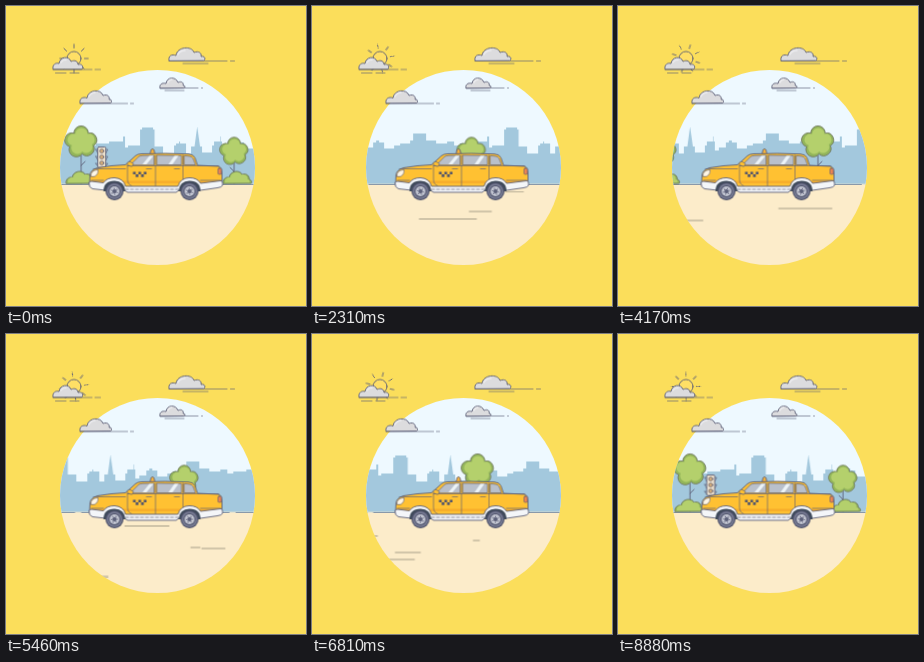
An HTML page that plays this animation: 300x300 px, repeating every 8910 ms.

```html
<!DOCTYPE html>
<html lang="en">
<head>
<meta charset="utf-8">
<title>Taxi ride</title>
<style>
  html, body { margin: 0; width: 100%; height: 100%; overflow: hidden; background: #fbde5b; }
  svg { display: block; width: 100vw; height: 100vh; }
  .ink { fill: none; stroke: #5c5e76; stroke-width: .9; stroke-linecap: round; stroke-linejoin: round; }
  .thin { stroke-width: .65; }
  .cloud { fill: #dcdcde; }
  .leaf { fill: #93b65a; stroke: #71795f; }
  .light { fill: #b4d06c; }
  .loop { animation: slide 8910ms linear infinite; }
  .city { --run: 224px; }
  .road { --run: 926.6px; }
  .trees { --run: 308.87px; animation-duration: 2970ms; }
  .kerb { --run: 154.43px; animation-duration: 1485ms; }
  .sun, .wheel { transform-box: view-box; animation: spin 2970ms linear infinite; }
  .sun { --turn: 45deg; transform-origin: 68px 53px; }
  .wheel { --turn: -360deg; animation-duration: 495ms; transform-origin: 0 0; }
  @keyframes slide { to { transform: translateX(var(--run)); } }
  @keyframes spin { to { transform: rotate(var(--turn)); } }
</style>
</head>
<body>
<svg viewBox="0 0 300 300">
  <defs>
    <clipPath id="disc"><circle cx="151.5" cy="162" r="97.5"/></clipPath>

    <path id="skyline" d="M0 179V142H3V137H6V135H9V137H14V143H24V140H30V138H40V135H43V128H56V135H66V138H77V136H84
      V140H90V138H103V136H117V131H119V142H122V140H134V124H136V122H147V124H148.500V141H157V148H168V140H170V138H173V136H174V138H180
      V148H185V141H188.500L191.200 121L194 141H196V147H206V140H208V136H214V131H214.600V136H216V145H220V142H224V179Z"/>

    <path id="blob" d="M-7-8A7 7 0 0 1 7-8A6.600 6.600 0 0 1 12 4A7 7 0 0 1 1 12A7 7 0 0 1-11 5A6.800 6.800 0 0 1-7-8Z"/>
    <path id="mound" d="M-14 178C-15 174-11 171-8 172C-7 165 3 164 5 169C10 167 13 172 12 174C15 174 15 178 14 178Z"/>
    <g id="bush">
      <use href="#mound" class="ink leaf"/>
      <use href="#mound" class="light" transform="translate(0 24) scale(.86)"/>
    </g>
    <g id="canopy">
      <use href="#blob" class="ink leaf"/>
      <use href="#blob" class="light" transform="translate(.3 -.5) scale(.84)"/>
    </g>
    <g id="pair">
      <path class="ink" d="M75 178V150M75 160L79 156M228 178V157M228 166L224 162"/>
      <use href="#canopy" transform="translate(75 136) scale(1.04)"/>
      <use href="#canopy" transform="translate(228 145.500) scale(.92)"/>
      <use href="#bush" x="74"/>
      <use href="#bush" x="231"/>
    </g>

    <g id="signal">
      <path class="ink" d="M-1 178V162M1 178V162"/>
      <path class="ink thin" d="M-6 144H6L4 148M-6 144L-4 148M-6 151H6L4 155M-6 151L-4 155M-6 158H6L4 161M-6 158L-4 161"/>
      <rect class="ink" x="-4" y="141.500" width="8" height="20.500" rx="1" style="fill:#eee2cd"/>
      <g class="ink thin" style="fill:#d5ad79">
        <circle cy="145.500" r="2"/><circle cy="151.500" r="2"/><circle cy="157.500" r="2"/>
      </g>
    </g>

    <g id="tyre">
      <circle r="9" fill="#4c5069"/>
      <circle r="7.800" fill="#777b93"/>
      <circle r="5.900" fill="#4c5069"/>
      <circle r="5" fill="#c3c6d2"/>
      <path class="wheel ink thin" d="M-3.500 0H3.500M-1.750-3L1.750 3M1.750-3L-1.750 3"/>
      <circle r="2" fill="#5c6079"/>
    </g>
  </defs>

  <rect width="300" height="300" fill="#fbde5b"/>

  <g transform="translate(0 -.5)">
    <g clip-path="url(#disc)">
      <rect x="50" y="60" width="203" height="119" fill="#eef9ff"/>
      <g class="loop city" fill="#a3c8dd">
        <use href="#skyline"/><use href="#skyline" x="-224"/><use href="#skyline" x="224"/>
      </g>
      <rect x="50" y="178.500" width="203" height="84" fill="#fcecca"/>
      <path class="loop kerb ink" style="stroke:#7e91a6" stroke-dasharray="147.430 7" d="M-183.400 178.500H437"/>
      <g class="loop trees">
        <use href="#pair"/><use href="#pair" x="-308.87"/>
      </g>
      <g class="loop road">
        <use href="#signal" x="95.700"/><use href="#signal" x="-830.900"/>
        <path class="ink thin" style="stroke:#777365" d="M-47 186h18M11.500 218h20M-133 213.500h57M-83 206h22M-372 215h23M-273 203h53
          M-449 192.500h44M-383 214h9M-490 243h24M-665 202.500h22M-625 219h25M-631 226h25M-547 207h6"/>
      </g>
    </g>

    <!-- sun and clouds -->
    <g class="sun ink">
      <path id="rays" d="M68 42.500V38.800M68 63.500V67.200M57.500 53H53.800M78.500 53H82.200"/>
      <use href="#rays" transform="rotate(45 68 53)"/>
    </g>
    <circle class="ink" cx="68" cy="53" r="7" style="fill:#ffdf66"/>
    <g class="ink">
      <path class="cloud" d="M47 63.500C46 59 50 57 53 58C54 51 63 50 65 56C69 54 72 56 72 59C76 58 78 61 76 63.500Z"/>
      <path class="cloud" d="M163 55C162 50 166 48.500 170 50C171 41 186 40 188 47C193 45 196 48 195 51C199 50 200 54 198 55Z"/>
      <path class="cloud" d="M74 97.500C73 93 77 91 81 92.500C82 84 95 83 97 90C102 88 104 92 103 94C106 93 106 97.500 105 97.500Z"/>
      <path class="cloud" d="M154 82.500C153 79 156 77 160 78C161 71 170 71 172 77C176 75 178 78 177 80C180 80 179 82.500 178 82.500Z"/>
      <path class="thin" d="M47 64H86M89 64H94.500M49.500 67.500H60M64 67.500H73M163 55.500H221M224.500 55.500H228.500M177 58H202
        M74 98H121.500M124.500 98H127.500M154 82.500H192M195.500 82.500H196.500M159 85H178"/>
    </g>
    <g fill="none" stroke="#ececef" stroke-width="1.300" stroke-linecap="round">
      <path d="M55 57Q57 54 60 54.500M172 49Q174 45 179 45M83 91Q85 87 89 87M162 77Q163 74 166 74"/>
    </g>

    <!-- taxi -->
    <g transform="translate(-.5 -.2)">
      <path class="ink" d="M144.500 149L145.500 144.500Q147 142.500 148.500 144.500L149.500 149Z" style="fill:#f9b43a"/>
      <path class="ink" style="fill:#ffc132" d="M84 180L84.500 170Q85 164.500 92 162.500Q106 160 120 159.500L130 150.500Q132 148.700 136 148.500
        Q160 147.500 183 148.700Q188 149 189.500 152.500L192 160L213 161Q216.500 162 216.500 168V180L194 183H100Z"/>
      <path class="ink thin" style="fill:#b9c0cb" d="M125 159.500L133 151.500Q134 150.500 137 150.300L148.500 150V159.500ZM151.500 150L176 150.300V159.500H151.500ZM179 150.500Q186 150.500 187.500 153L190 159.500H179Z"/>
      <path fill="#edf4f8" d="M137 159L144 150.500H148L141 159ZM163 159L169 150.500H173L167 159Z"/>
      <path fill="#f7ae2b" d="M86 175.500H215V178H86Z"/>
      <path class="ink thin" d="M122 160.500V174Q122 179 126 180.500M150 150V180.500M177.500 150V174M88 163.500H120M122 160.500H213M86 175H98M195 175H215M141 163.500H146M169 163.500H174"/>
      <path class="ink thin" d="M122 159.500Q121 156 125 156.500L128 158.500L126.500 161Z" style="fill:#ffc132"/>
      <path fill="#50546c" d="M127.500 166.500h2.700v2.600h-2.700zM132.900 166.500h2.700v2.600h-2.700zM138.300 166.500h2.700v2.600h-2.700zM130.200 169.100h2.700v2.600h-2.700zM135.600 169.100h2.700v2.600h-2.700z"/>
      <path class="ink thin" style="fill:#fff6e4" d="M85.500 171Q84.500 165 92.500 164.500Q93 169 89.500 171Z"/>
      <rect class="ink thin" x="212.500" y="163" width="3.500" height="6" rx="1" style="fill:#ee8450"/>
      <path class="ink" style="fill:#f4f6f9" d="M83.500 178Q83.500 175.800 86 176L98 177.500Q101 172.500 109 172.500Q118 173 120 181H172.500Q175 172.500 184 172.500Q192 172.500 195 178L215 175.500Q217.500 175.500 217 180
        Q216.500 182 212 182.500L195 185H173L171 187H122L119 185H100L87 183.500Q83.500 182.500 83.500 178Z"/>
      <path class="ink thin" d="M120 184H173" stroke-dasharray="3 2"/>
      <path d="M98 186Q98 175.500 109 175.500Q119 175.500 120 186ZM173 186Q174 175.500 184 175.500Q195 175.500 195 186Z" fill="#3f4a5a"/>
      <use href="#tyre" x="109" y="186"/>
      <use href="#tyre" x="184" y="186"/>
    </g>
  </g>
</svg>
</body>
</html>
```
